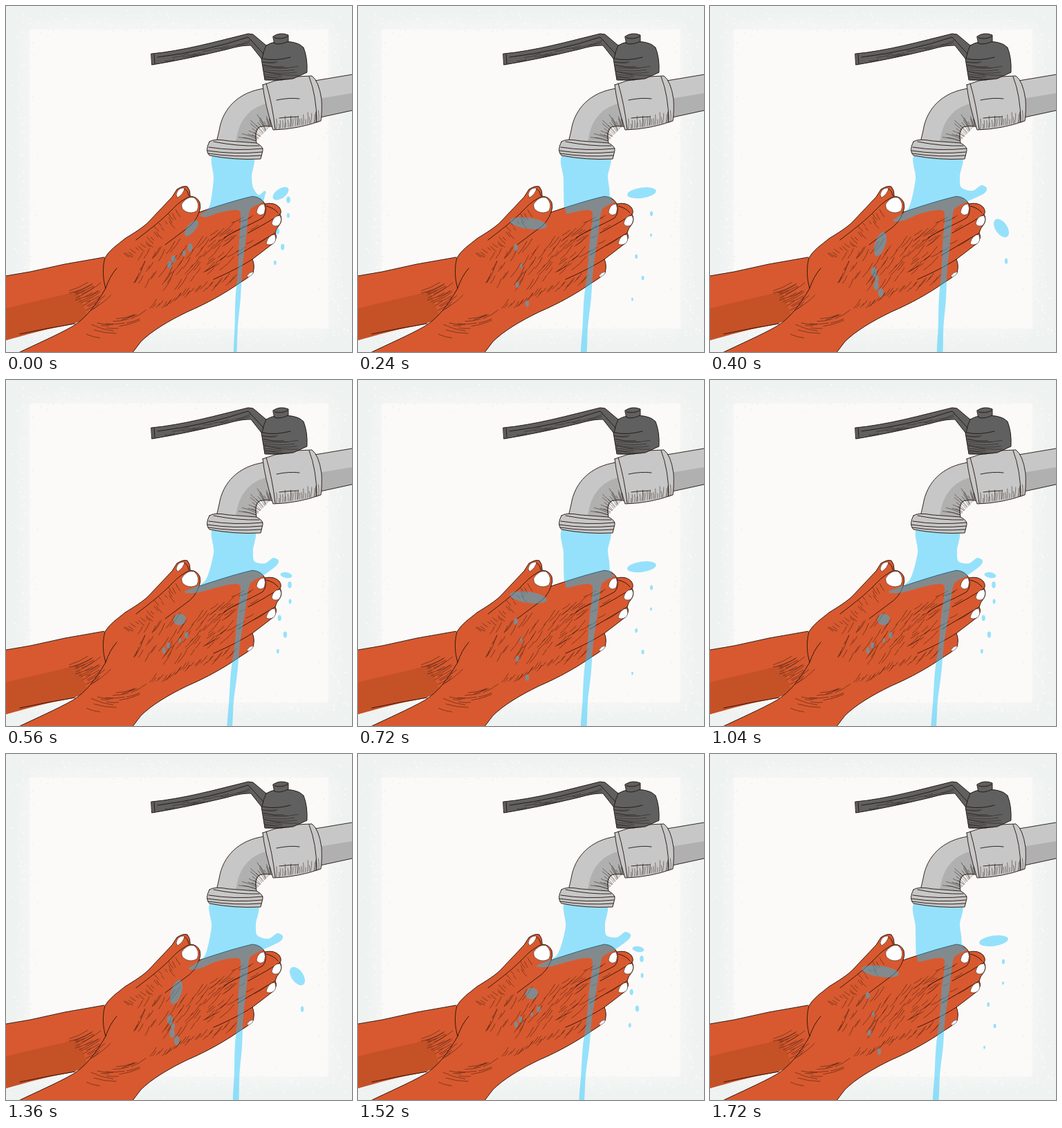
An HTML page with a canvas for the animation above (1760 ms loop, 500x500 px).

```html
<!DOCTYPE html>
<html lang="en">
<head>
<meta charset="utf-8">
<title>Washing hands</title>
<style>
  html, body { margin: 0; width: 100%; height: 100%; overflow: hidden; background: #eef2f1; }
  canvas, svg { position: absolute; left: 0; top: 0; width: 500px; height: 500px; }
  .ink { fill: none; stroke: #21130e; stroke-width: .9; stroke-linecap: round; stroke-linejoin: round; }
  .fine { stroke-width: .6; stroke-opacity: .8; }
  .skin { fill: #d8592f; }
  .shade { fill: #c55127; }
  .nail { fill: #fff; stroke: #21130e; stroke-width: .5; }
  .steel { fill: #c7c7c7; }
  .dim { fill: #b0b0b0; }
  .iron { fill: #606060; }
  .soot { fill: #4a4a4a; }
</style>
</head>
<body>
<canvas id="paper" width="500" height="500"></canvas>
<svg viewBox="0 0 500 500">
  <g id="hands">
    <path class="skin" d="M0 390L35 384L85 373L142 363L165 400L120 450L96 460C60 466 28 475 0 483Z"/>
    <path class="shade" d="M0 437C35 428 70 421 104 412L118 450L96 460C60 466 28 475 0 483Z"/>
    <path class="ink" d="M0 390L35 384L85 373L142 363M20 474Q62 465 100 459"/>
    <path id="hand" class="skin" d="M16 502C45 488 75 475 96 463C115 452 130 432 144 408C140 395 139 378 143 364C150 352 160 346 172 336C185 328 198 320 206 312L240 276L247 265Q256 259 262 261Q267 267 266 275Q276 275 280 284Q282 291 279 298C300 291 330 281 356 275Q369 276 374 286Q388 283 395 291Q399 297 396 301Q400 308 396 315Q390 322 389 328Q393 335 386 343Q372 354 356 366Q360 374 357 386Q350 393 338 400C315 416 290 430 262 442C235 455 210 470 195 485L182 502Z"/>
    <path class="shade" d="M214 322L250 286Q256 296 266 300Q258 314 246 318ZM300 400Q330 388 357 380L357 386Q350 393 338 400L290 428Z"/>
    <use href="#hand" class="ink" style="fill:none"/>
    <path class="ink" d="M144 408Q150 390 160 379M279 298Q274 314 258 324L230 345M266 275Q252 281 240 294C225 310 205 325 188 338M374 286Q378 298 371 306C350 318 330 325 315 335M396 301Q380 312 350 328M389 328Q365 342 335 360M356 366C340 376 325 384 300 395M376 289Q388 292 393 299M257 264Q263 266 264 274"/>
    <path class="nail" d="M246 273Q248 262 258 263Q257 271 248 277ZM254 286Q262 274 272 277Q281 285 276 296Q268 301 260 297Q253 294 254 286ZM362 298Q364 286 373 286Q376 292 373 300Q366 305 362 298ZM384 314Q387 302 396 303Q400 310 394 317Q386 320 384 314ZM376 343Q379 331 388 330Q392 337 387 343Q379 347 376 343ZM348 390Q352 384 358 384Q357 389 350 392Z"/>
  </g>
  <g fill="#1fc5ff" opacity=".46">
    <path id="flow"/>
    <path id="drops"/>
  </g>
  <g id="tap">
    <path class="steel" d="M446 108L500 99V151L454 161Z"/>
    <path class="dim" d="M452 134L500 126V151L454 161Z"/>
    <path class="ink" d="M446 108L500 99M454 161L500 151"/>
    <path class="steel" d="M374 119C336 124 313 148 308 180L304 197L362 200Q360 180 367 175Q376 172 387 175Z"/>
    <path class="dim" d="M380 140C350 146 335 168 332 199L362 200Q360 180 367 175Q376 172 387 175Z"/>
    <path class="ink" d="M374 119C336 124 313 148 308 180L304 197M362 198Q358 180 366 175Q376 172 387 175"/>
    <path id="joint" class="steel" d="M371 114Q404 101 442 101Q452 108 456 135Q457 153 455 166Q422 178 386 179Q374 142 371 114Z"/>
    <path class="dim" d="M381 139Q420 137 455 127Q457 150 455 166Q422 178 386 179Z"/>
    <use href="#joint" class="ink" style="fill:none"/>
    <path class="ink" d="M376 112Q385 142 389 178M438 102Q449 130 449 168M391 136Q410 132 424 134M395 162Q410 160 422 160"/>
    <path id="rim" class="steel" d="M294 196Q300 191 322 195L362 198Q372 203 371 209L368 221Q330 223 294 216Q287 209 294 196Z"/>
    <path class="dim" d="M320 207Q345 211 371 208L368 221Q340 223 318 219Z"/>
    <use href="#rim" class="ink" style="fill:none"/>
    <path class="ink" d="M293 204Q330 210 371 206M291 209Q330 215 370 211M292 213Q330 219 369 216M300 196Q335 203 366 202"/>
    <path id="lever" class="iron" d="M210 69C255 65 305 51 350 40L357 41L376 57Q384 52 392 52Q420 49 430 60Q436 75 435 96L415 105Q394 108 374 107L369 76L354 57Q342 56 318 63Q260 77 211 85Z"/>
    <path class="soot" d="M211 79Q290 65 342 50L356 56Q342 56 318 63Q260 77 211 85ZM369 76L411 74L413 105L374 107Z"/>
    <path id="knob" class="iron" d="M386 44Q396 37 408 42L408 51Q396 57 388 54Z"/>
    <use href="#lever" class="ink" style="fill:none"/>
    <use href="#knob" class="ink" style="fill:none"/>
    <path class="ink" d="M214 70L215 83M219 74Q290 65 350 45L372 69M388 46Q398 49 407 44M376 57Q372 65 370 76Q390 80 411 74"/>
  </g>
</svg>
<script>
const $ = id => document.getElementById(id);

let seed = 7;
const rnd = () => (seed = seed * 16807 % 2147483647) / 2147483647;
const mix = (a, b, k) => a + (b - a) * k;

// Mixes numbers, or lists and objects of them
function blend(a, b, k) {
  if (typeof a === 'number') return mix(a, b, k);
  if (Array.isArray(a)) return a.map((v, i) => blend(v, b[i], k));
  return Object.fromEntries(Object.keys(a).map(key => [key, blend(a[key], b[key], k)]));
}

// Soft sheet with a speckled border
function paintPaper() {
  const c = $('paper').getContext('2d'), edge = '#eef2f1', sheet = '#fbfaf8';
  c.fillStyle = edge;
  c.fillRect(0, 0, 500, 500);
  c.fillStyle = c.shadowColor = sheet;
  c.shadowBlur = 24;
  c.fillRect(34, 34, 432, 432);
  c.shadowBlur = 0;
  for (let i = 0; i < 7000; i++) {
    const x = rnd() * 500, y = rnd() * 500;
    const d = Math.min(x, y, 500 - x, 500 - y);
    if (rnd() < Math.abs(d - 26) / 24) continue;
    c.fillStyle = d < 28 ? sheet : edge;
    c.beginPath();
    c.arc(x, y, .3 + rnd(), 0, 7);
    c.fill();
  }
}

// Curved pen strokes scattered over a patch: a base line swept by depth
function hatch(parent, from, to, depth, angles, len, n) {
  let d = '';
  for (let i = 0; i < n; i++) {
    const k = (i + rnd()) / n, s = rnd();
    const [x, y] = blend(from, to, k).map((v, j) => v + depth[j] * s);
    const a = (mix(...angles, k) + rnd() * 10 - 5) * Math.PI / 180;
    const l = len * (.4 + rnd() * .8), dx = Math.cos(a) * l, dy = Math.sin(a) * l;
    d += `M${x} ${y}q${dx / 2 - dy * .08} ${dy / 2 + dx * .08} ${dx} ${dy}`;
  }
  const p = document.createElementNS('http://www.w3.org/2000/svg', 'path');
  p.setAttribute('class', 'ink fine');
  p.setAttribute('d', d);
  $(parent).append(p);
}

function drawLines() {
  hatch('hands', [185, 430], [320, 385], [-5, -60], [-65, -42], 24, 60);
  hatch('hands', [206, 445], [325, 402], [0, -10], [-50, -50], 14, 28);
  hatch('hands', [270, 345], [350, 300], [15, 45], [-32, -28], 20, 22);
  hatch('hands', [165, 358], [240, 288], [12, 10], [30, 60], 11, 22);
  hatch('hands', [88, 412], [118, 444], [14, -6], [-22, -35], 30, 18);
  hatch('hands', [115, 475], [185, 460], [0, -16], [20, -30], 28, 14);

  hatch('tap', [360, 196], [383, 172], [0, 0], [190, 265], 22, 20);
  hatch('tap', [390, 178], [453, 167], [0, 0], [-90, -88], 14, 24);
  hatch('tap', [371, 79], [375, 106], [0, 0], [3, 3], 42, 12);
  hatch('tap', [225, 78], [335, 54], [0, 3], [-11, -14], 28, 10);
}

// The stream's edges, where it pools and splashes, and its loose drops
const poses = [
  { at: 0, left: 300, right: 356, pool: [280, 302], tip: [376, 269], bulge: 3, foot: 331, thin: 2.2,
    splash: [397, 271, 13, 7, -35], puddle: [268, 321, 14, 6, -50],
    air: [[408, 280], [390, 371]], airSize: 4, drip: [[266, 349], [234, 374]], dripSize: 5 },
  { at: 2, left: 300, right: 358, pool: [258, 306], tip: [394, 261], bulge: 8, foot: 323, thin: 3.5,
    splash: [405, 282, 8.5, 4, 10], puddle: [251, 346, 9, 8, -30],
    air: [[410, 296], [394, 392]], airSize: 4, drip: [[261, 369], [226, 391]], dripSize: 4 },
  { at: 5, left: 297, right: 362, pool: [299, 292], tip: [367, 277], bulge: 3, foot: 326, thin: 4,
    splash: [410, 270, 21, 7.5, -8], puddle: [246, 314, 27, 8, 8],
    air: [[424, 300], [398, 424]], airSize: 3, drip: [[228, 349], [240, 430]], dripSize: 4 },
  { at: 8, left: 297, right: 362, pool: [264, 310], tip: [400, 263], bulge: 8, foot: 332, thin: 4,
    splash: [421, 321, 15, 8.5, 55], puddle: [246, 344, 18, 7.5, -72],
    air: [[428, 368], [428, 370]], airSize: 3, drip: [[237, 384], [245, 414]], dripSize: 6 }
];
const cycle = [...poses, { ...poses[0], at: 9 }];

// Closed smooth curve through the points
function smooth(p) {
  const n = p.length, at = i => p[(i + n) % n];
  const ctl = (i, s) => at(i).map((v, j) => v + s * (at(i + 1)[j] - at(i - 1)[j]) / 7);
  return `M${p[0]}` + p.map((_, i) => `C${ctl(i, 1)} ${ctl(i + 1, -1)} ${at(i + 1)}`).join('') + 'Z';
}

function flow({ left, right, pool, tip: [x, y], bulge, foot, thin }) {
  const thread = side => Array.from({ length: 6 }, (_, i) => {
    const k = i / 5, half = mix(6, thin, Math.sqrt(k)) + Math.sin(i * 2.5) * .7;
    return [mix(345, foot, 1 - (1 - k) ** 1.3) + side * half, mix(300, 504, k)];
  });
  const under = blend(pool, [303, 300], .4);
  return smooth([
    [left, 214], [right, 214], [right - 1, 246], [right + 1, 262],
    [mix(right, x, .45), y + 4], [x - bulge, y - bulge / 2], [x, y], [x - bulge / 2, y + bulge],
    [371, 283], [356, 291], ...thread(1), ...thread(-1).reverse(),
    [328, 295], [304, 300], [under[0], under[1] + 4], pool,
    blend(pool, [left, 284], .7), [left, 250]
  ]);
}

function oval([x, y, rx, ry, turn = 0]) {
  const a = turn * Math.PI / 180, dx = rx * Math.cos(a), dy = rx * Math.sin(a);
  const arc = s => `a${rx} ${ry} ${turn} 1 0 ${2 * dx * s} ${2 * dy * s}`;
  return `M${x - dx} ${y - dy}${arc(1)}${arc(-1)}Z`;
}

// Drops of uneven size falling between two points
function trail([from, to], size, n) {
  const sway = Math.hypot(to[0] - from[0], to[1] - from[1]) * .07;
  return Array.from({ length: n }, (_, i) => {
    const [x, y] = blend(from, to, i / (n - 1));
    const r = size * (.4 + .3 * Math.abs(Math.cos(i * 1.9)));
    return oval([x + Math.sin(i * 2.4) * sway, y, r, r * 1.7]);
  }).join('');
}

const drawings = Array.from({ length: 9 }, (_, i) => {
  const next = cycle.findIndex(p => p.at > i), a = cycle[next - 1], b = cycle[next];
  const p = blend(a, b, (i - a.at) / (b.at - a.at));
  return {
    flow: flow(p),
    drops: oval(p.splash) + oval(p.puddle) + trail(p.air, p.airSize, 5) + trail(p.drip, p.dripSize, 4)
  };
});

// Three drawings per four 40 ms ticks
function play() {
  const tick = Math.floor(performance.now() % 1760 / 40);
  const pose = drawings[Math.round(tick * .75) % 9];
  $('flow').setAttribute('d', pose.flow);
  $('drops').setAttribute('d', pose.drops);
  requestAnimationFrame(play);
}

paintPaper();
drawLines();
play();
</script>
</body>
</html>
```
